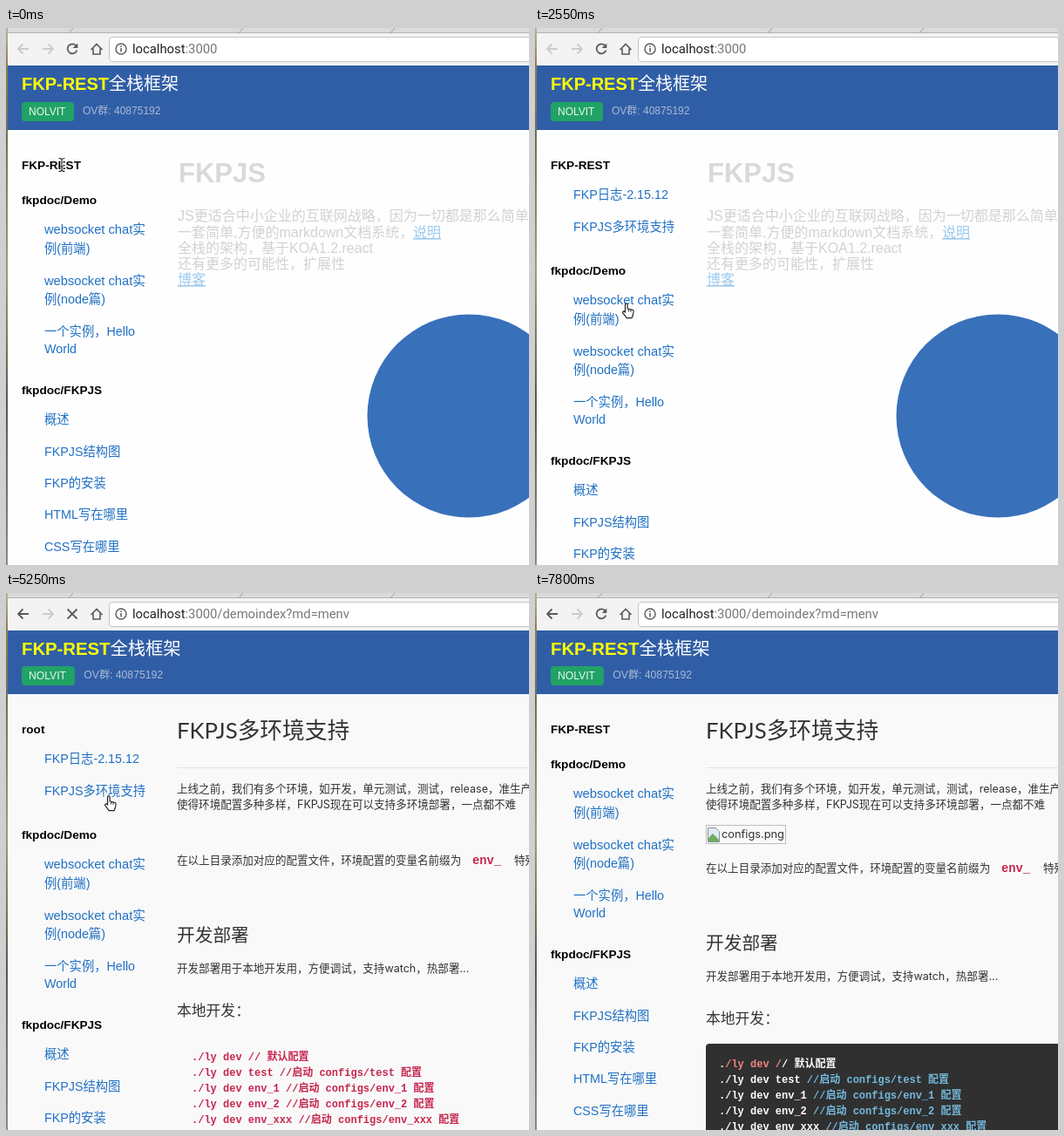
Recreate the animation shown at these times as an HTML page. Size 600x616 px, loop 8.1 s.

```html
<!DOCTYPE html>
<html lang="zh">
<head>
<meta charset="utf-8">
<title>FKP-REST</title>
<style>
html, body { margin: 0; width: 100%; height: 100%; overflow: hidden; background: #fefefe; }
#stage { display: block; width: 600px; height: 616px; }
text { white-space: pre; font-family: "Liberation Sans", "Noto Sans CJK SC", "Noto Sans CJK", sans-serif; }
.geo { font-family: Inter, "Noto Sans CJK SC", "Noto Sans CJK", sans-serif; }
.lato { font-family: Lato, "Noto Sans CJK SC", "Noto Sans CJK", sans-serif; }
.mono { font-family: "Liberation Mono", "Noto Sans CJK SC", "Noto Sans CJK", monospace; font-weight: bold; }
.url { font-family: Roboto, sans-serif; }
.bold { font-weight: bold; }
.light { font-weight: 300; }
</style>
</head>
<body>
<svg id="stage" viewBox="0 0 600 616" xmlns="http://www.w3.org/2000/svg"></svg>
<script>
const LOOP = 8100, STEP = 150;
const LINK = '#2070c4', RED = '#c7254e';
const HUB = 'nolvit', GROUP = 'OV群', GROUP_NO = '40875192', SITE = 'www.bolvu.com';

// ---- markup helpers
const text = (x, y, s, size, fill, cls = '', more = '') =>
  `<text x="${x}" y="${y}" font-size="${size}" fill="${fill}" class="${cls}" ${more}>${s}</text>`;
const rect = (x, y, w, h, fill, more = '') =>
  `<rect x="${x}" y="${y}" width="${w}" height="${h}" fill="${fill}" ${more}/>`;
const dot = (x, y, r, fill) => `<circle cx="${x}" cy="${y}" r="${r}" fill="${fill}"/>`;
const line = (d, stroke, w = 1, more = '') =>
  `<path d="${d}" fill="none" stroke="${stroke}" stroke-width="${w}" ${more}/>`;
const group = (id, body) => `<g id="${id}">${body}</g>`;
const span = (s, fill) => `<tspan fill="${fill}">${s}</tspan>`;

// ---- browser frame
function browser() {
  const icon = '#5a5a5a';
  return `<linearGradient id="edge" x2="0" y2="1">
      <stop stop-color="#b9b09a"/><stop offset=".07" stop-color="#8d7d55"/>
      <stop offset=".2" stop-color="#6d705a"/><stop offset=".45" stop-color="#a09a80"/>
      <stop offset=".7" stop-color="#55594a"/><stop offset="1" stop-color="#8a8c7c"/>
    </linearGradient>` +
    rect(0, 0, 600, 6, '#dadada') +
    rect(0, 6, 600, 37, '#f3f3f3') +
    line('M0 5.5H600', '#b4b4b4') +
    line('M72 6L77 0M267 6L272 0M441 6L446 0', '#9c9c9c') +
    line('M26 24H14M19.5 18.5L14 24l5.5 5.5', icon, 1.8, 'id="back"') +
    line('M42 24H54M48.5 18.5L54 24l-5.500 5.5', '#cbcbcb', 1.8) +
    group('reload', line('M80.600 20.600A5.500 5.500 0 1 0 81.400 25.400', icon, 1.8) +
      `<path d="M82.300 17.500v5.600h-5.600z" fill="${icon}"/>`) +
    line('M70.500 18.500l11 11M81.500 18.500l-11 11', icon, 1.8, 'id="stop"') +
    line('M97.500 25l6.500-6.500 6.500 6.500M100 23.500V30h8v-6.500', icon, 1.6) +
    rect(118.5, 10.5, 500, 28, '#fff', 'rx="3.5" stroke="#c4c4c4"') +
    `<circle cx="132" cy="24" r="6" fill="none" stroke="${icon}" stroke-width="1.4"/>` +
    line('M132 23v4.500M132 20.300v1.600', icon, 1.5) +
    `<text x="145" y="29" font-size="14.8" fill="#222" class="url">localhost<tspan id="path" fill="#777"></tspan></text>`;
}

function banner(bottom, scale, dy) {
  return rect(2, 42, 598, bottom - 42, '#305ea6') +
    line('M2 42.500H600', '#6d88b5') +
    text(18, 71, span('FKP-REST', '#ff0'), 20 * scale, '#fff', 'bold') +
    text(18 + 100 * scale, 71, '全栈框架', 20 * scale, '#fff', dy ? '' : 'light') +
    rect(18, 85 - dy, 60 * scale, 22, '#21a366', 'rx="4"') +
    text(26, 100 - dy, HUB.toUpperCase(), 12 * scale, '#e9f6ef') +
    text(88 * scale, 99 - dy, `${GROUP}: ${GROUP_NO}`, 12 * scale, '#a9b9d5');
}

// ---- sidebar
const links = rows => rows.map(([y, s]) =>
  text(44, y, s, s.startsWith('web') ? 14.7 : 14.3, LINK)).join('');
const folder = (id, rows) =>
  `<svg id="${id}" x="0" width="196" height="0" overflow="hidden">${links(rows)}</svg>`;

function sidebar() {
  const head = s => text(18, 0, s, 13.6, '#000', 'bold');
  return group('side',
    `<text id="rootName" x="18" y="162" font-size="13.6" class="bold"></text>` +
    folder('rootList', [[20, 'FKP日志-2.15.12'], [57, 'FKPJS多环境支持']]) +
    group('demoHead', head('fkpdoc/Demo')) +
    folder('demoList', [[20, 'websocket chat实'], [42, '例(前端)'], [79, 'websocket chat实'],
      [100, '例(node篇)'], [137, '一个实例，Hello'], [157, 'World']]) +
    group('docs', head('fkpdoc/FKPJS') + links([[34, '概述'], [71, 'FKPJS结构图'], [107, 'FKP的安装'],
      [143, 'HTML写在哪里'], [180, 'CSS写在哪里'], [216, 'JAVASCRIPT写哪'], [238, '里'], [274, '启动模式']])));
}

// ---- pages
function home() {
  const pale = '#d2d2d2', sky = '#9ccaf0', u = 'text-decoration="underline"';
  const p = (y, s) => text(197, y, s, 16, pale, 'light');
  return rect(2, 42, 598, 574, '#fefefe') + banner(117, 1, 0) +
    text(198, 177, 'FKPJS', 31, '#d9d9d9', 'bold') +
    p(221, 'JS更适合中小企业的互联网战略，因为一切都是那么简单') +
    p(240, '一套简单,方便的markdown文档系统，') +
    text(467, 240, '说明', 16, sky, '', u) +
    p(258, '全栈的架构，基于KOA1.2.react') +
    p(276, '还有更多的可能性，扩展性') +
    text(197, 294, '博客', 16, sky, '', u) +
    dot(531, 445, 116.5, '#3870ba');
}

const shell = () => rect(2, 42, 598, 574, '#f9f9f9') + banner(116, 1.015, 1);
const rule = line('M196 200.500H600', '#e2e2e2');

function chat() {
  const q = (y, s) => text(217, y, s, 12, '#5c5c5c', 'geo');
  return shell() + rule +
    text(196, 167, 'websocket chat实例(前端)', 26.4, '#333', 'geo light') +
    rect(196, 217, 6, 134, '#ccc') +
    q(240, 'fkp内建了websocket模块, websocket用于实时推送信息到所有客户端，') +
    q(258, 'websocket最方便直观的一种体现，因此我们先从聊天室开始，看看怎么') +
    q(288, '在以前，聊天室非常火爆啊，非常多的约炮，约妹的故事都发生在聊天室，') +
    q(306, '聊天室，当然是开放的') +
    q(336, '这个聊天室只是一个简单功能的聊天室，有兴趣的朋友可以深入下去，记') +
    text(196, 434, 'DEMO演示效果图', 20.8, '#333', 'geo') +
    group('shot', screenshot());
}

function screenshot() {
  const s = (x, y, str, size, fill = '#333', cls = '') => text(x, y, str, size, fill, cls);
  const menu = [[256, '文件'], [277, '修改'], [299, '视图'], [321, '历史记录'], [356, '书签'],
    [377, '其他人'], [406, '窗口'], [427, '帮助']];
  const lime = '#1fd01f', teal = '#14a79d';
  const back = rect(196, 457, 404, 159, '#fdfdfd') +
    rect(196, 457, 404, 11, '#f3f3f3') + line('M196 468.500H600', '#b9bfae') +
    dot(209, 462.5, 3.2, '#333') + s(221, 465, 'Vesper', 7.4, '#222', 'bold') +
    menu.map(([x, w]) => s(x, 465, w, 6.7)).join('') +
    rect(196, 469, 404, 17, '#dedede') + dot(201, 478, 2.6, '#c4c4c4') + dot(210, 478, 2.6, '#c4c4c4') +
    '<path d="M216 486l5-13h86l5 13z" fill="#e9e9e9" stroke="#c2c2c2" stroke-width=".6"/>' +
    '<path d="M308 486l5-13h86l5 13z" fill="#f7f7f7" stroke="#c2c2c2" stroke-width=".6"/>' +
    [226, 318].map(x => s(x, 481.5, 'FKP-MONGO数据库博客、', 6.5) + s(x + 78, 481.5, '×', 7)).join('') +
    rect(196, 486, 404, 15, '#f2f2f2') + line('M196 501H600', '#cfcfcf') +
    s(200, 496, '→ C', 9, '#777') +
    rect(227, 487.5, 341, 11.5, '#fff', 'rx="2" stroke="#ccc" stroke-width=".6"') +
    s(239, 496, SITE, 7.3) + s(554, 497, '☆', 10, '#888') +
    rect(571, 489, 8, 8, '#e0524f') + rect(586, 489, 8, 8, '#c9c9c9') +
    rect(196, 502, 64, 114, '#fafafa') +
    rect(351, 514, 55, 13, '#1212d0', 'transform="rotate(1.5 378 520)"') +
    s(356, 523.5, '聊天室有动静啊', 6.7, '#fff') +
    dot(425, 528, 21, '#3870ba') +
    rect(260, 555, 212, 18, '#e8f3fb') + s(265, 567.5, '发布', 8, teal, 'bold') +
    s(283, 567, HUB + '第三方登录, 登陆前尝试左右拖动一新博客', 5.5, '#a9b4bd') +
    s(412, 567, `${GROUP}:${GROUP_NO}`, 6.2, lime, 'bold') + s(458, 567, 'Nolvit', 6.2, teal) +
    rect(270, 588, 10, 10, '#e0567f') +
    s(286, 597, '基于websocket聊天室实例', 9.6, teal, 'bold') + s(401, 597, '23小时前', 6.6, '#aaa') +
    s(276, 618, '由于近天有一', 6.6, '#bbb') + s(333, 618, '啊：fkp_demo_chat', 6.6, '#e8a860');
  const front = rect(468, 506, 140, 120, '#000', 'rx="6" opacity=".1"') +
    rect(471, 509, 140, 120, '#e0e0e0', 'rx="5"') +
    dot(480, 519, 2.8, '#f0524a') + dot(489, 519, 2.8, '#f2b32e') + dot(498, 519, 2.8, '#3fbf4c') +
    '<path d="M505 528l5-13h84l5 13z" fill="#f7f7f7" stroke="#bbb" stroke-width=".6"/>' +
    s(514, 523.5, 'FKP-websocket的demo演', 6.6) + s(589, 523.5, '×', 7) +
    rect(471, 528, 129, 15, '#f2f2f2') + s(474, 538.5, '← → C', 8.5, '#777') +
    rect(514, 530, 100, 11.5, '#fff', 'stroke="#ccc" stroke-width=".6"') +
    s(527, 538.5, SITE + '/chat', 7.5) +
    rect(471, 543, 129, 73, '#f1f1ec') + rect(473, 544, 127, 18, '#e8f3fb') +
    s(480, 555.5, 'FKPJS', 6.5) + s(502, 555.5, `${GROUP}:${GROUP_NO}`, 6.2, lime, 'bold') +
    s(548, 555.5, 'Nolvit', 6.4, teal, 'bold') +
    rect(477, 568, 130, 60, '#fff', 'stroke="#ddd8c8"') +
    s(484, 582, 'FKPJS：websocket效果', 7.6);
  return back + front;
}

function log() {
  const rows = ['增加多环境支持', '增加websocket模块', '增加markdown文档系统'];
  return shell() + rule + text(196, 167, 'FKP日志-2.15.12', 25.7, '#333', 'lato') +
    rows.map((s, i) => text(196, 229 + 18 * i, s, 12.5, '#333', 'geo')).join('');
}

function menv() {
  const p = (y, s) => text(196, y, s, 12.55, '#333', 'geo');
  const names = ['test', 'env_1', 'env_2', 'env_xxx'];
  const code = (x, y, rows) => rows.map((s, i) => text(x, y + 18 * i, s, 12, RED, 'mono')).join('');
  const note = n => `//启动 configs/${n} 配置`;
  const plain = ['./ly dev // 默认配置', ...names.map(n => `./ly dev ${n} ${note(n)}`)];
  const tinted = [span('.', '#fff') + span('/ly dev /', '#f0857c') + span('/ 默认配置', '#fff'),
    ...names.map(n => span(`./ly dev ${n} `, '#fff') + span(note(n), '#74b9dc'))];
  return shell() + rule + text(196, 167, 'FKPJS多环境支持', 25.7, '#333', 'lato') +
    p(229, '上线之前，我们有多个环境，如开发，单元测试，测试，release，准生产') +
    p(247, '使得环境配置多种多样，FKPJS现在可以支持多环境部署，一点都不难') +
    group('below',
      p(311, '在以上目录添加对应的配置文件，环境配置的变量名前缀为') +
      text(535, 311, 'env_', 13.8, RED, 'mono') + text(583, 311, '特殊', 12.55, '#333', 'geo') +
      text(196, 400, '开发部署', 20.7, '#333', 'geo') +
      p(435, '开发部署用于本地开发用，方便调试，支持watch，热部署...') +
      text(196, 485, '本地开发：', 16.8, '#333', 'geo')) +
    group('raw', code(213, 536, plain)) +
    group('done',
      rect(196.5, 266.5, 91, 21, 'none', 'stroke="#bdbdbd"') +
      '<path d="M198.500 269.500h9l4 4v12h-13z" fill="#dfeaf8" stroke="#8b9199"/>' +
      '<path d="M199 285v-4l5-5 7 7v2z" fill="#6fae5f"/>' +
      text(214, 281, 'configs.png', 12.8, '#333', 'geo') +
      rect(196, 517, 420, 110, '#303030', 'rx="4"') + code(211, 544, tinted));
}

function cursors() {
  const bar = 'M-3.500-7.500Q0-7.500 0-5.500Q0-7.500 3.500-7.500M0-5.500V5.500M-3.500 7.500Q0 7.500 0 5.500Q0 7.500 3.500 7.500M-2 2H2';
  return group('beam', line(bar, '#fff', 3) + line(bar, '#222', 1.1)) +
    group('hand', `<path transform="translate(-7 -9)" fill="#fff" stroke="#222" stroke-width="1.200" stroke-linejoin="round"
      d="M4.500 11V2.200a1.300 1.300 0 0 1 2.600 0V7l5.600 1.300q1.600.5 1.400 2.200l-.8 4-1.300 3.200H6.200L2 12.200q-1-1.500.4-2.200 1-.3 2.100 1z"/>` +
      line('M1.500-1.500v3M4-1v3', '#222', .9));
}

const stage = document.getElementById('stage');
stage.innerHTML = group('home', home()) + group('chat', chat()) + group('log', log()) +
  group('menv', menv()) + sidebar() + browser() + rect(0, 0, 2, 616, 'url(#edge)') + cursors();

// ---- timeline
const $ = id => document.getElementById(id);
const show = (id, on) => $(id).style.display = on ? '' : 'none';
const move = (id, x, y) => $(id).setAttribute('transform', `translate(${x} ${y})`);
const swing = k => .5 - Math.cos(Math.PI * Math.min(1, Math.max(0, k))) / 2;
const ramp = (t, from, to) => swing((t - from) / (to - from));
const within = (t, spans) => spans.some(([a, b]) => t >= a && t < b);

// time, x, y, pointer shape from then on
const TRACK = [
  [0, 64, 157, 'beam'], [450, 64, 157, 'beam'], [1050, 66, 279, 'beam'], [2100, 66, 279, 'beam'],
  [2250, 78, 292, 'hand'], [2550, 106, 324, 'hand'], [3300, 106, 324, 'hand'], [4050, 110, 196, 'hand'],
  [4500, 110, 196, 'hand'], [4950, 119, 241, 'hand'], [5250, 119, 241, 'hand'], [5850, 74, 168, 'beam'],
  [6000, 66, 157, 'beam'], [6150, 66, 157, 'beam'], [6300, 69, 191, 'beam'], [6600, 168, 282, 'beam'],
  [6900, 252, 400, 'beam'], [7200, 347, 589, 'beam'], [7500, 510, 604, 'beam'], [7650, 556, 612, 'beam'],
  [7800, 556, 640, 'none'], [LOOP, 556, 640, 'none']];

function pointer(t) {
  const i = TRACK.findIndex(k => k[0] > t), a = TRACK[i - 1], b = TRACK[i];
  const k = (t - a[0]) / (b[0] - a[0]);
  for (const id of ['beam', 'hand']) {
    show(id, a[3] === id);
    move(id, a[1] + (b[1] - a[1]) * k, a[2] + (b[2] - a[2]) * k);
  }
}

function fold(id, y, h) {
  $(id).setAttribute('y', y);
  $(id).setAttribute('height', Math.max(h, .01));
  show(id, h > .5);
}

function draw(t) {
  const page = t < 3000 ? 'home' : t < 4500 ? 'chat' : t < 5250 ? 'log' : 'menv';
  for (const id of ['home', 'chat', 'log', 'menv']) show(id, id === page);
  show('shot', t >= 3150);

  const doc = t < 2850 ? '' : t < 4350 ? 'Demo_chat' : t < 5250 ? 'log' : 'menv';
  $('path').textContent = ':3000' + (doc && '/demoindex?md=' + doc);
  const busy = within(t, [[2850, 3450], [4350, 4800], [5250, 5700]]);
  show('stop', busy);
  show('reload', !busy);
  $('back').setAttribute('stroke', t < 3000 ? '#cbcbcb' : '#5a5a5a');
  const bare = within(t, [[3000, 3450], [4500, 4800], [5250, 5700]]);
  $('rootName').textContent = bare ? 'root' : 'FKP-REST';

  const ready = t >= 5700;
  show('raw', !ready);
  show('done', ready);
  move('below', 0, ready ? 9 : 0);

  const rootH = t < 6300 ? 81 * ramp(t, 0, 600) : 0;
  const demoH = 178 * (t < 1650 ? 1 - ramp(t, 1050, 1500) : ramp(t, 1650, 2250));
  const demoY = 202 + rootH;
  fold('rootList', 176, rootH);
  move('demoHead', 0, demoY);
  fold('demoList', demoY + 14, demoH);
  move('docs', 0, demoY + 40 + demoH);
  move('side', 0, page === 'home' ? 0 : -1);
  pointer(t);
}

const start = performance.now();
let last = -1;
function tick() {
  const t = Math.floor((performance.now() - start) % LOOP / STEP) * STEP;
  if (t !== last) draw(last = t);
  requestAnimationFrame(tick);
}
tick();
</script>
</body>
</html>
```
